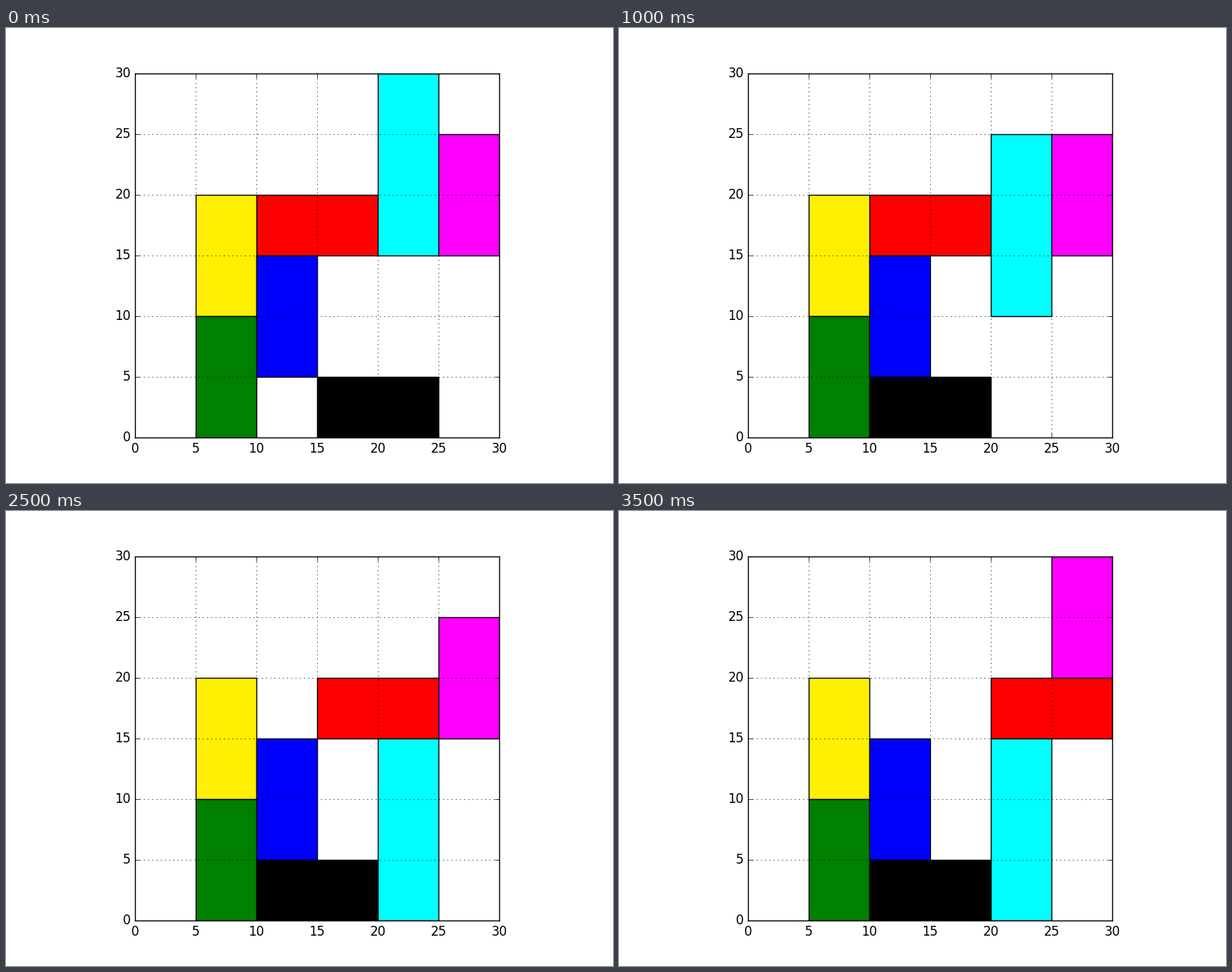
Animation, 800 px wide and 600 px high, one loop 4000 ms. Source, as a matplotlib script:

```python
import matplotlib.pyplot as plt
from matplotlib.animation import FuncAnimation
from matplotlib.patches import Rectangle

plt.style.use("classic")

CELL = 5

# name: (colour, column, row, width, height), measured in cells
BLOCKS = {
    "red": ("#ff0000", 2, 3, 2, 1),
    "yellow": ("#ffef00", 1, 2, 1, 2),
    "green": ("#008000", 1, 0, 1, 2),
    "blue": ("#0000ff", 2, 1, 1, 2),
    "black": ("#000000", 3, 0, 2, 1),
    "cyan": ("#00ffff", 4, 3, 1, 3),
    "magenta": ("#ff00ff", 5, 3, 1, 2),
}

# one slide per step: block, dx, dy
MOVES = [
    ("black", -1, 0),
    ("cyan", 0, -1),
    ("cyan", 0, -1),
    ("cyan", 0, -1),
    ("red", 1, 0),
    ("magenta", 0, 1),
    ("red", 1, 0),
]

fig, ax = plt.subplots(figsize=(8, 6), dpi=100, facecolor="white")
fig.subplots_adjust(left=0.125, right=0.9, bottom=0.1, top=0.9)
ax.set_aspect("equal")
ax.set_xlim(0, 6 * CELL)
ax.set_ylim(0, 6 * CELL)
ax.set_xticks(range(0, 31, CELL))
ax.set_yticks(range(0, 31, CELL))
ax.grid(True)

patches = {}
for name, (colour, col, row, w, h) in BLOCKS.items():
    patches[name] = ax.add_patch(
        Rectangle((col * CELL, row * CELL), w * CELL, h * CELL,
                  facecolor=colour, edgecolor="black")
    )


def draw(step):
    cells = {name: list(block[1:3]) for name, block in BLOCKS.items()}
    for name, dx, dy in MOVES[:step]:
        cells[name][0] += dx
        cells[name][1] += dy
    for name, (col, row) in cells.items():
        patches[name].set_xy((col * CELL, row * CELL))
    return list(patches.values())


anim = FuncAnimation(fig, draw, frames=len(MOVES) + 1, interval=500,
                     repeat=True, repeat_delay=0, blit=False)
plt.show()
```
